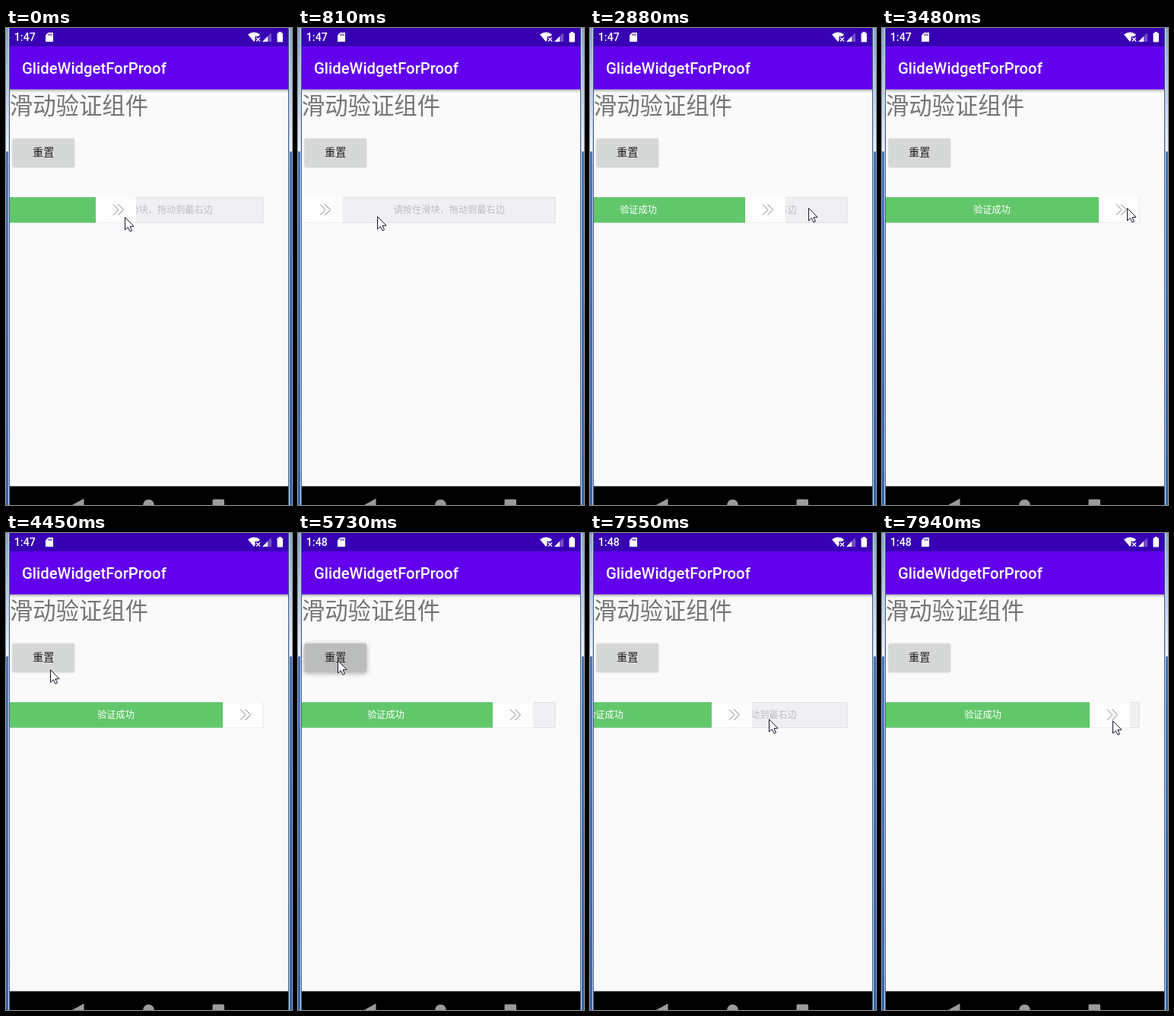
An HTML page with a canvas that plays this animation: 376 by 626 pixels, repeating every 8000 ms.

```html
<!DOCTYPE html>
<html lang="zh">
<head>
<meta charset="utf-8">
<style>
html, body { margin: 0; width: 100%; height: 100%; overflow: hidden; background: #fafafa; }
canvas { display: block; width: 376px; height: 626px; }
</style>
</head>
<body>
<canvas id="stage"></canvas>
<script>
const W = 376, H = 626, LOOP = 8000;
const LEFT = 5, HOME = 5, FAR = 284, KNOB = 54;
const CJK = '"Noto Sans CJK SC", "Noto Sans CJK", sans-serif';
const canvas = document.getElementById('stage');
const ctx = canvas.getContext('2d');
const dpr = window.devicePixelRatio || 1;
canvas.width = W * dpr;
canvas.height = H * dpr;

const linear = p => p;
const easeIn = n => p => p ** n;
const easeOut = n => p => 1 - (1 - p) ** n;
const clamp = p => Math.max(0, Math.min(1, p));
const lerp = (a, b, p) => a + (b - a) * p;

// Each move takes the pointer to x, y in equal jumps.
// The slider follows late and arrives at the share "done" of the move.
const RESET = 5730, CLOCK_TURN = 4800;
const SLIDER_DELAY = 0.115, TICK_SLACK = 0.15;
const first = { x: 156, y: 248, slider: 117 };
const moves = [
  { start: 120, end: 1080, jumps: 8, x: 86, y: 247, ease: linear, slider: HOME, done: 0.6 },
  { start: 1230, end: 2050, jumps: 6, x: 38, y: 238, ease: linear },
  { start: 2460, end: 3480, jumps: 8, x: 322, y: 236, ease: easeOut(3), slider: FAR, done: 0.657 },
  { start: 3630, end: 4570, jumps: 8, x: 54, y: 178, ease: easeOut(2) },
  { start: 4690, end: 5140, jumps: 4, x: 52, y: 167, ease: linear },
  { start: RESET, end: 6420, jumps: 6, x: 36, y: 239, ease: easeIn(3), slider: HOME, done: 0.612 },
  { start: 6980, end: 7940, jumps: 8, x: 303, y: 246, ease: easeOut(1.4), slider: 272, done: 1 }
];

function pose(t) {
  let { x, y, slider } = first;
  for (const m of moves) {
    if (t < m.start) break;
    const tick = (m.end - m.start) / (m.jumps - 1);
    const jump = Math.floor((t - m.start) / tick + TICK_SLACK) + 1;
    const p = Math.min(1, jump / m.jumps);
    x = lerp(x, m.x, m.ease(p));
    y = lerp(y, m.y, m.ease(p));
    if (m.done) slider = lerp(slider, m.slider, clamp((p - SLIDER_DELAY) / (m.done - SLIDER_DELAY)));
  }
  return { x: Math.round(x), y: Math.round(y), slider: Math.round(slider) };
}

function rect(x, y, w, h, color) {
  ctx.fillStyle = color;
  ctx.fillRect(x, y, w, h);
}

function roundRect(x, y, w, h, r, color) {
  ctx.fillStyle = color;
  ctx.beginPath();
  ctx.roundRect(x, y, w, h, r);
  ctx.fill();
}

function trace(points, close) {
  ctx.beginPath();
  points.forEach(([x, y]) => ctx.lineTo(x, y));
  if (close) ctx.closePath();
}

function poly(points, color) {
  trace(points, true);
  ctx.fillStyle = color;
  ctx.fill();
}

function stroke(points, color, width, close) {
  trace(points, close);
  ctx.strokeStyle = color;
  ctx.lineWidth = width;
  ctx.stroke();
}

function text(str, x, y, font, color, align = 'left') {
  ctx.font = font;
  ctx.fillStyle = color;
  ctx.textAlign = align;
  ctx.fillText(str, x, y);
}

function fade(y0, y1, from, to) {
  const g = ctx.createLinearGradient(0, y0, 0, y1);
  g.addColorStop(0, from);
  g.addColorStop(1, to);
  return g;
}

function drawDesktop() {
  rect(0, 0, W, 162, fade(0, 162, '#86a5cf', '#f0f5fb'));
  rect(0, 162, W, H - 162, fade(162, H, '#4878bd', '#3565ad'));
  for (const x of [3, 372]) rect(x, 0, 1, H, '#c3d6ee');
  for (const x of [4, 371]) rect(x, 0, 1, H, '#41587f');
  rect(LEFT, 0, 366, H, '#fafafa');
}

function drawStatusBar(clock) {
  const bar = '#3700b3';
  rect(LEFT, 0, 366, 24, bar);
  text(clock, 10.8, 17, '500 14.2px Roboto, sans-serif', '#fff');
  // Memory card
  poly([[55.5, 6], [62, 6], [62, 18], [52, 18], [52, 9.5]], '#fff');
  for (let i = 0; i < 3; i++) rect(55.5 + i * 2, 7.5, 1, 2.5, bar);
  // Wi-Fi fan with a cross
  ctx.fillStyle = '#fff';
  ctx.beginPath();
  ctx.moveTo(326, 18);
  ctx.lineTo(318, 8.5);
  ctx.quadraticCurveTo(326, 2.5, 334, 8.5);
  ctx.fill();
  rect(327.5, 11, 7, 8, bar);
  for (const d of [0, 5]) stroke([[329 + d, 12.5], [334 - d, 17.5]], '#fff', 1.3);
  // Signal
  poly([[337, 18], [349, 6], [349, 18]], 'rgba(255,255,255,0.3)');
  poly([[337, 18], [344, 11], [344, 18]], '#fff');
  // Battery
  roundRect(356.5, 6.5, 7.5, 12, 1, '#fff');
  rect(358.5, 5, 3.5, 2, '#fff');
}

function drawAppBar() {
  rect(LEFT, 80, 366, 5, fade(80, 85, 'rgba(0,0,0,0.3)', 'rgba(0,0,0,0)'));
  rect(LEFT, 24, 366, 56.5, '#6200ee');
  text('GlideWidgetForProof', 21, 60, '500 20.3px Roboto, sans-serif', '#fff');
}

function drawButton(pressed) {
  ctx.save();
  ctx.shadowColor = pressed ? 'rgba(0,0,0,0.35)' : 'rgba(0,0,0,0.2)';
  ctx.shadowBlur = (pressed ? 6 : 2) * dpr;
  ctx.shadowOffsetY = (pressed ? 1.5 : 0.5) * dpr;
  roundRect(8.5, 145, 81.5, 37.5, 2, pressed ? '#bbbdbc' : '#d6d7d7');
  ctx.restore();
  text('重置', 49.2, 168, '14.2px ' + CJK, '#212121', 'center');
}

function drawSlider(x) {
  const font = '12.2px ' + CJK;
  rect(LEFT, 222, 333.5, 34, '#dedee2');
  rect(LEFT + 1, 223, 331.5, 32, '#f0f0f3');
  text('请按住滑块，拖动到最右边', 198.8, 243, font, '#bcbcc2', 'center');

  ctx.save();
  ctx.beginPath();
  ctx.rect(LEFT, 221, 334, 36);
  ctx.clip();
  const edge = x > HOME ? x + 1 : x;
  const knob = x + KNOB - edge;
  rect(LEFT, 222, edge - LEFT, 33.5, '#62c76b');
  text('验证成功', x - 139.5, 243, font, '#fff', 'center');
  rect(edge, 221.5, knob + 0.3, 34.5, '#eeeeef');
  rect(edge, 221.5, knob - 0.2, 33.5, '#fdfdfd');
  ctx.restore();

  for (const dx of [24, 30.5]) {
    stroke([[x + dx, 231.5], [x + dx + 7, 238.5], [x + dx, 245.5]], '#858585', 1);
  }
}

function drawNavBar() {
  const gray = '#9b9b9b';
  rect(LEFT, 601.4, 366, 25, '#000');
  poly([[87, 626], [102.5, 617.5], [102.5, 634]], gray);
  ctx.beginPath();
  ctx.arc(187.5, 626, 7.3, 0, Math.PI * 2);
  ctx.fill();
  roundRect(271.5, 618.5, 15.5, 15.5, 1.5, gray);
}

function drawPointer(x, y) {
  const arrow = [[0, 0], [0, 16.5], [3.8, 13], [6.5, 18.5], [9, 17.4], [6.5, 12], [11.5, 11.7]]
    .map(([dx, dy]) => [x + 0.5 + dx, y + 0.5 + dy]);
  poly(arrow, '#fff');
  stroke(arrow, '#15152a', 1, true);
}

function draw(t) {
  const { x, y, slider } = pose(t);
  ctx.setTransform(dpr, 0, 0, dpr, 0, 0);
  drawDesktop();
  drawStatusBar(t < CLOCK_TURN ? '1:47' : '1:48');
  drawAppBar();
  text('滑动验证组件', 4.8, 113, '30.4px ' + CJK, '#757575');
  drawButton(t >= RESET && t < RESET + 270);
  drawSlider(slider);
  drawNavBar();
  drawPointer(x, y);
}

const begin = performance.now();
function tick() {
  draw((performance.now() - begin) % LOOP);
  requestAnimationFrame(tick);
}
tick();
</script>
</body>
</html>
```
